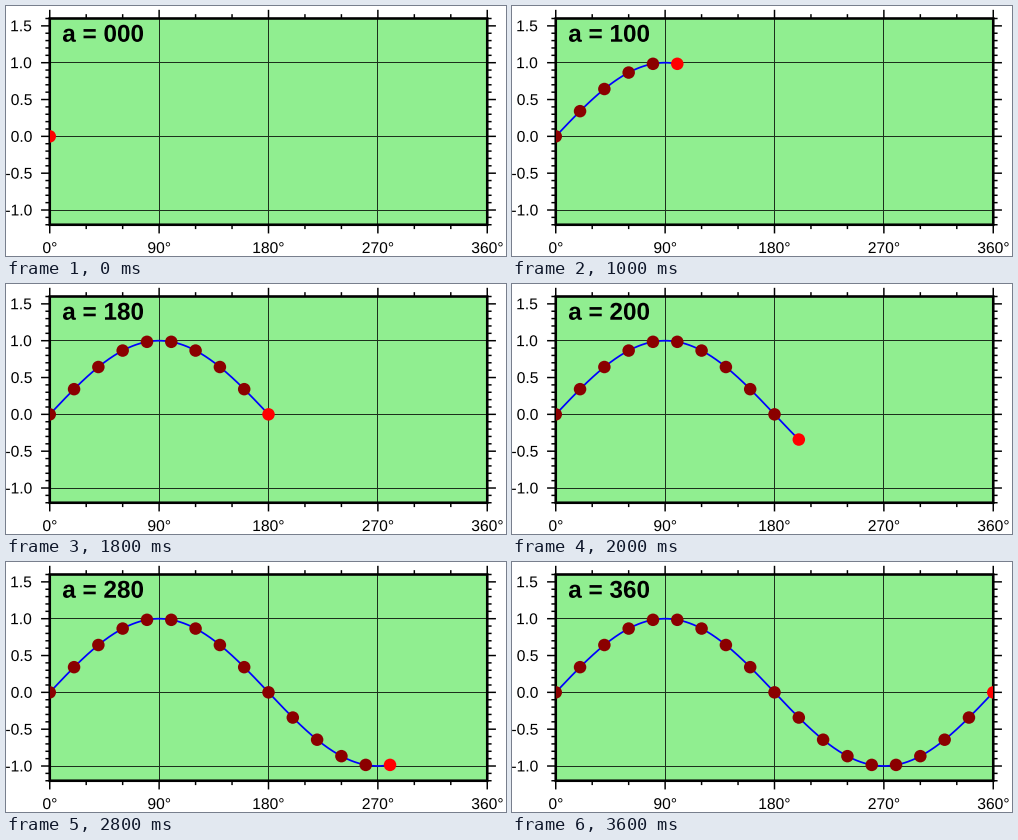
Recreate the animation shown at these times as a matplotlib script. Size 500 px wide and 250 px high, loop 3800 ms.

```python
import numpy as np
import matplotlib.pyplot as plt
from matplotlib.animation import FuncAnimation
from matplotlib.patches import Circle, PathPatch, Rectangle
from matplotlib.textpath import TextPath
from matplotlib.transforms import Affine2D

DPI = 125
W, H = 500, 250
LEFT, BOTTOM = 0.35 * DPI, 0.25 * DPI
PLOT_W, PLOT_H = 3.5 * DPI, 1.65 * DPI
Y_MIN, Y_MAX = -1.2, 1.6
PT = DPI / 72
MAJOR, MINOR, GAP = 5 * PT, 2.5 * PT, 5 * PT
STEP = 20
COUNT = 360 // STEP + 1


def px(deg):
    return LEFT + deg * PLOT_W / 360


def py(val):
    return BOTTOM + (val - Y_MIN) * PLOT_H / (Y_MAX - Y_MIN)


def center(v):
    """Middle of the pixel that holds v."""
    return np.floor(v) + 0.5


fig = plt.figure(figsize=(W / DPI, H / DPI), dpi=DPI, facecolor="white")
ax = fig.add_axes([0, 0, 1, 1])
ax.set_xlim(0, W)
ax.set_ylim(0, H)
ax.axis("off")


def line(xs, ys, width, color="black", z=2):
    return ax.plot(xs, ys, color=color, lw=width, zorder=z, snap=False,
                   solid_capstyle="butt")[0]


def outline(text, x, y, size, ha=0.0, va=0.0, weight="normal"):
    """Text outline with the given fraction of its box at (x, y)."""
    font = {"family": "Liberation Sans", "weight": weight}
    path = TextPath((0, 0), text, size=size * PT, prop=font)
    box = path.get_extents()
    return Affine2D().translate(x - ha * (box.x0 + box.x1),
                                y - va * box.y1).transform_path(path)


def label(text, x, y, **place):
    ax.add_patch(PathPatch(outline(text, x, y, 9, **place),
                           fc="black", lw=0, zorder=4))


right, top = LEFT + PLOT_W, BOTTOM + PLOT_H
ax.add_patch(Rectangle((LEFT, BOTTOM), PLOT_W, PLOT_H, fc="#90ee90",
                       lw=0, zorder=0))

# Grid lines
for deg in (90, 180, 270):
    line([center(px(deg))] * 2, [BOTTOM, top], 0.576, "#1c301c", 1)
for val in (-1, 0, 1):
    line([LEFT, right], [center(py(val))] * 2, 0.576, "#1c301c", 1)

# Ticks and labels
for deg in range(0, 361, 30):
    size = MINOR if deg % 90 else MAJOR
    x = px(deg)
    line([x, x], [BOTTOM - size, BOTTOM], 0.85)
    line([x, x], [top, top + size], 0.85)
    if deg % 90 == 0:
        label(f"{deg}°", x, BOTTOM - MAJOR - GAP, ha=0.5, va=1)
for tenth in range(-12, 17):
    size = MINOR if tenth % 5 else MAJOR
    y = py(tenth / 10)
    line([LEFT - size, LEFT], [y, y], 0.85)
    line([right, right + size], [y, y], 0.85)
    if tenth % 5 == 0:
        label(f"{tenth / 10:.1f}", LEFT - MAJOR - GAP, y, ha=1, va=0.5)

ax.add_patch(Rectangle((LEFT, BOTTOM), PLOT_W, PLOT_H, fill=False,
                       ec="black", lw=1.5, snap=False, zorder=3))

# Moving parts, cut off at the plot edge
clip = Rectangle((LEFT, BOTTOM), PLOT_W, PLOT_H, transform=ax.transData)
curve = line([], [], 1, "blue", 5)
curve.set_clip_path(clip)
dots = []
for k in range(COUNT):
    spot = (px(k * STEP), py(np.sin(np.radians(k * STEP))))
    dot = ax.add_patch(Circle(spot, 0.05 * DPI, lw=0, zorder=6))
    dot.set_clip_path(clip)
    dots.append(dot)
title = ax.add_patch(PathPatch(outline("a", 0, 0, 14), fc="black", lw=0,
                               zorder=8))


def update(i):
    angle = i * STEP
    deg = np.arange(0, angle + 1)
    curve.set_data(px(deg), py(np.sin(np.radians(deg))))
    for k, dot in enumerate(dots):
        dot.set_visible(k <= i)
        dot.set_facecolor("red" if k == i else "#8b0000")
    title.set_path(outline(f"a = {angle:03d}", LEFT + 0.1 * DPI,
                           top - 0.05 * DPI, 14, va=1, weight="bold"))
    return [curve, title, *dots]


anim = FuncAnimation(fig, update, frames=COUNT, interval=200, repeat=True)
plt.show()
```
